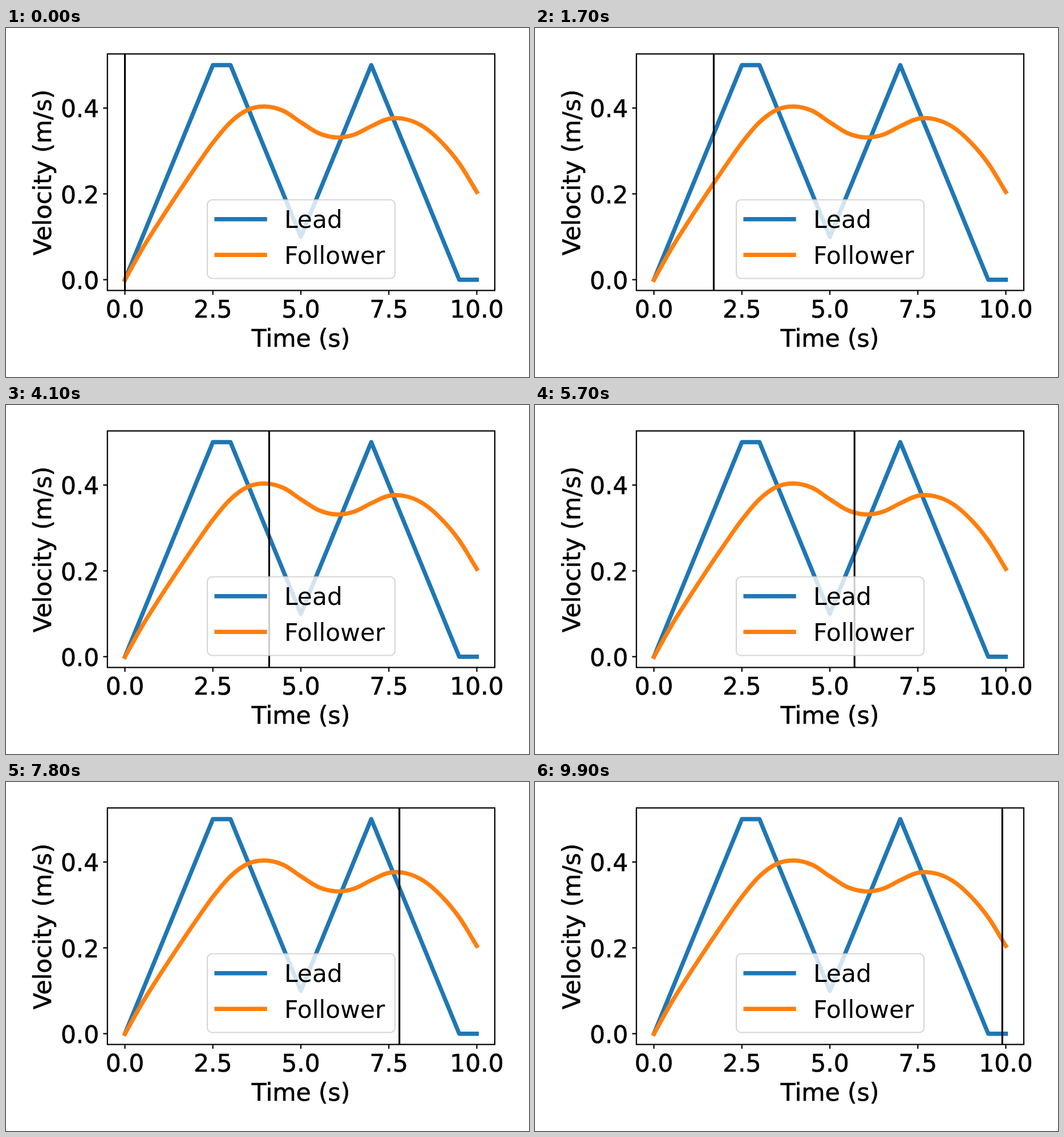
Recreate the animation shown at these times as an HTML page. Size 917x611 px, loop 10 s.

```html
<!DOCTYPE html>
<html lang="en">
<head>
<meta charset="utf-8">
<title>Velocity over time</title>
<style>
html, body { margin: 0; width: 100%; height: 100%; overflow: hidden; background: #fff; }
svg { display: block; width: 917px; height: 611px; font: 42.4px "DejaVu Sans", sans-serif; }
.line { fill: none; stroke-width: 7.4; stroke-linecap: square; stroke-linejoin: round; }
.lead { stroke: #1f77b4; }
.follower { stroke: #ff7f0e; }
.axis { fill: none; stroke: #000; stroke-width: 2.2; }
.labels { stroke: #000; stroke-width: .6; }
</style>
</head>
<body>
<svg viewBox="0 0 917 611">
  <path id="lead" class="line lead"/>
  <path id="follower" class="line follower"/>
  <path id="cursor" d="M0 46V459" stroke="#000" stroke-width="3.1"/>
  <path id="ticks" class="axis"/>
  <rect class="axis" x="177.8" y="45.4" width="679.2" height="414.1"/>
  <g id="labels" class="labels" text-anchor="middle">
    <text x="517" y="557.5">Time (s)</text>
    <text transform="translate(78.5 253) rotate(-90)">Velocity (m/s)</text>
  </g>
  <rect x="353" y="300.8" width="329" height="137.7" rx="8.5" fill="#fff" stroke="#ccc" stroke-width="2.1" fill-opacity=".8" stroke-opacity=".8"/>
  <path class="line lead" d="M369.1 334.7H454"/>
  <path class="line follower" d="M369.1 397.2H454"/>
  <text x="488" y="350">Lead</text>
  <text x="488" y="412.5">Follower</text>
</svg>
<script>
const $ = id => document.getElementById(id);
const px = t => 208.5 + 61.7 * t;
const py = v => 440.7 - 751.4 * v;

const lead = [[0, 0], [2.5, .5], [3, .5], [5, .1], [7, .5], [9.5, 0], [10, 0]];
$("lead").setAttribute("d", "M" + lead.map(([t, v]) => [px(t), py(v)]).join("L"));

// Heights at half-second intervals, joined by a smooth cubic spline
const heights = [441, 386, 337, 290, 244.5, 201, 165, 143, 137.5, 145, 165,
  184, 191.5, 187, 172, 159, 160, 173.5, 200, 237, 287];
const last = heights.length - 1;
const slope = i => {
  const a = Math.max(i - 1, 0), b = Math.min(i + 1, last);
  return (heights[b] - heights[a]) / (b - a);
};
let curve = `M${px(0)} ${heights[0]}`;
for (let i = 0; i < last; i++) {
  curve += `C${px((i + 1 / 3) / 2)} ${heights[i] + slope(i) / 3} ` +
    `${px((i + 2 / 3) / 2)} ${heights[i + 1] - slope(i + 1) / 3} ` +
    `${px((i + 1) / 2)} ${heights[i + 1]}`;
}
$("follower").setAttribute("d", curve);

let ticks = "";
function label(x, y, value, anchor) {
  $("labels").insertAdjacentHTML("beforeend",
    `<text x="${x}" y="${y}" text-anchor="${anchor}">${value.toFixed(1)}</text>`);
}
for (const t of [0, 2.5, 5, 7.5, 10]) {
  ticks += `M${px(t)} 459.5v7.4`;
  label(px(t), 507, t, "middle");
}
for (const v of [0, .2, .4]) {
  ticks += `M177.8 ${py(v)}h-7.4`;
  label(163.3, py(v) + 16.3, v, "end");
}
$("ticks").setAttribute("d", ticks);

const start = performance.now();
function draw() {
  const elapsed = Math.max(0, performance.now() - start) % 10000;
  const time = Math.floor(elapsed / 100) / 10;
  $("cursor").setAttribute("transform", `translate(${px(time)} 0)`);
  requestAnimationFrame(draw);
}
draw();
</script>
</body>
</html>
```
